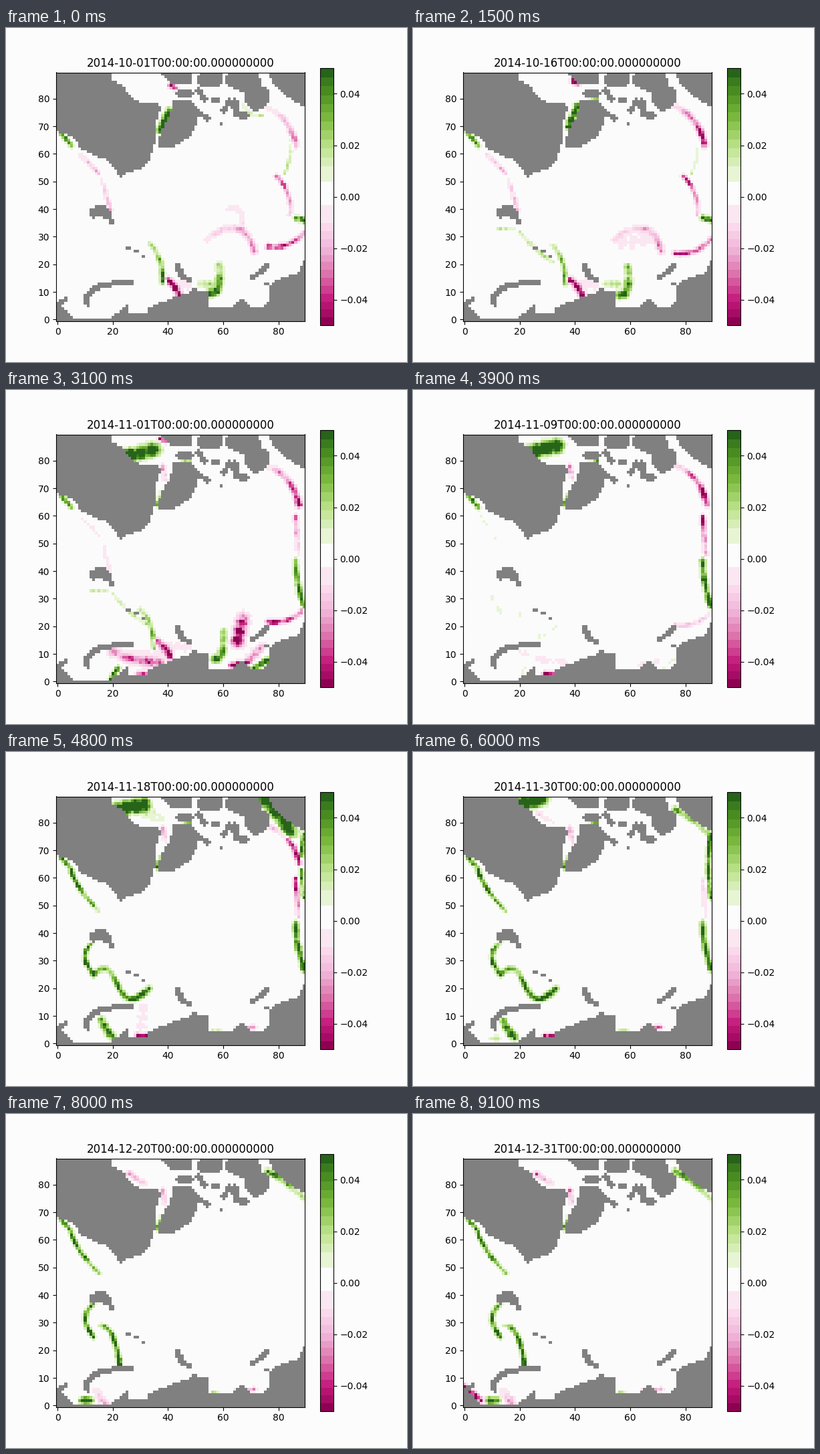
A matplotlib script for the animation above (9.2 s loop, 600 px wide and 500 px high).

```python
import numpy as np
import matplotlib.pyplot as plt
from matplotlib.animation import FuncAnimation
from matplotlib.colors import ListedColormap
from matplotlib.path import Path

SIZE, DAYS, SAMPLES, FADE = 90, 92, 48, 8
plt.rcParams["text.kerning_factor"] = 6

rows, cols = np.mgrid[:SIZE, :SIZE]
is_land = np.zeros((SIZE, SIZE), bool)
fronts = []


def curve(points):
    """Evenly sampled Bezier curve through the first and last control points."""
    t = np.linspace(0, 1, SAMPLES)[:, None, None]
    p = np.array(points, float)[None]
    while p.shape[1] > 1:
        p = p[:, :-1] * (1 - t[:, 0:1]) + p[:, 1:] * t[:, 0:1]
    return p[:, 0]


def nearest(x, y, line):
    """Index of and squared distance to the closest sample of a line."""
    dist = (x[:, None] - line[:, 0]) ** 2 + (y[:, None] - line[:, 1]) ** 2
    return dist.argmin(axis=1), dist.min(axis=1)


# ---- land ----
def land(*corners):
    centres = np.column_stack([cols.ravel() + .5, rows.ravel() + .5])
    is_land[Path(corners).contains_points(centres).reshape(SIZE, SIZE)] = True


def ridge(radius, *points):
    _, dist = nearest(cols.ravel(), rows.ravel(), curve(points))
    is_land[(dist < radius ** 2).reshape(SIZE, SIZE)] = True


land((0, 91), (20, 91), (20, 87.5), (24, 85.5), (28, 80), (30, 79.4), (37, 79),
     (38, 77), (36, 71), (36, 65), (33, 57), (30, 55), (26, 54), (23.5, 52),
     (19, 58), (14, 60), (8, 63), (7, 66), (0, 69))
land((39, 62.6), (37.4, 63.5), (37, 65.5), (39.5, 72.5), (41, 73), (42, 80),
     (49, 80), (51, 77), (51, 72), (49, 67.5), (44, 64), (42.5, 62.6))
land((38.4, 91), (38.4, 89.4), (41, 87), (41, 86), (49.4, 86), (49.4, 91))
land((52, 91), (51, 87), (53, 85), (57, 84.6), (59.6, 86), (59.6, 91))
land((62, 91), (61, 86), (67.5, 83), (68, 79), (72, 75.6), (77, 79), (77, 84),
     (74, 85), (73, 91))
land((76.6, 91), (78, 86), (84.6, 80.6), (91, 76.8), (91, 91))
land((0, -1), (0, 7), (6.6, 1), (19.5, 1), (25.5, 6), (26.5, 3), (33, 3),
     (33.5, 5), (37.5, 6.6), (48, 10.6), (49, 12), (55, 10.6), (55.2, 5), (63, 5),
     (67, 8), (71, 5), (75, 5.5), (77, 8), (77.4, 13), (79, 15), (87, 17.2),
     (89, 21.5), (91, 21.5), (91, -1))

# Islands
ridge(1.1, (44, 82), (48, 82))
ridge(1.1, (51, 83), (53, 80))
ridge(1.1, (51, 75), (54, 73))
ridge(.9, (56, 80), (58, 79))
ridge(1.1, (60, 76), (62, 79))
ridge(1.3, (64, 79), (64, 73), (68, 74))
ridge(.6, (59, 71))
ridge(1.8, (13, 38.5), (16, 41), (18, 38))
ridge(.8, (19, 36), (20, 35))
ridge(.8, (25.5, 26))
ridge(.8, (28.5, 25))
ridge(.6, (31, 23))
ridge(1, (11, 5.5), (9, 13), (19, 13), (27, 13.5))
ridge(.8, (1.5, 6.5), (3, 7.5))
ridge(1, (44, 20), (43, 17), (48, 14))
ridge(.9, (70, 15), (73, 17), (76, 20))
ridge(.6, (75, 13), (76, 13))


# ---- moving fronts ----
def front(days, width, strength, *points, drift=(0, 0)):
    """A line of change: strength runs from end to end, in thousandths."""
    level = np.linspace(*strength, SAMPLES)
    fronts.append((days, width, level, curve(points), np.array(drift)))


AUTUMN, FREEZE, WINTER = (-9, 38), (22, 40), (38, 100)

# Western shore and its island
front((-9, 100), .8, (50, 35), (1, 68), (5, 63))
front((-9, 34), .75, (-9, -20), (8, 60), (15, 53))
front((-9, 34), .75, (-6, -24), (16, 51), (19, 40))
front(WINTER, .8, (60, 25), (5, 62), (8, 55), (15, 48))
front((6, 38), .8, (16, 10), (12, 33), (18, 33))
front(WINTER, .8, (35, 60), (13, 37), (7, 32), (13, 25))

# Main ice edge, drifting west
front(AUTUMN, .9, (15, 45), (34, 28), (39, 24), (39, 14), drift=(-5, -2))
front((6, 38), .8, (14, 18), (20, 32), (24, 26), (32, 21))
front((38, 68), 1, (25, 60), (14, 26), (23, 33), (20, 7), (33, 20))
front((60, 100), .9, (25, 65), (17, 29), (22, 29), (24, 15), drift=(-3, 0))

# Southern seas
front(AUTUMN, 1.1, (-40, -60), (40, 15), (43, 13), (45, 9), drift=(-5, 0))
front(AUTUMN, 2, (-6, -7), (41, 13), (47, 13))
front(FREEZE, 1.6, (-24, -35), (20, 11), (28, 7), (37, 7))
front(FREEZE, 2.4, (-6, -7), (29, 9), (38, 11))
front((26, 74), .8, (-50, -45), (29, 3), (32, 3))
front((42, 56), 2, (-6, -8), (31, 13), (30, 5))
front((40, 68), 1.3, (40, 60), (17, 9), (18, 6), (21, 3), drift=(-4, -1))
for days in (FREEZE, (62, 80)):
    front(days, .9, (40, 55), (19, 1), (22, 5))
front((58, 100), 1.1, (55, 60), (9, 2), (12, 2))
front((60, 100), 1.5, (-9, -22), (14, 5), (17, 1))
front((80, 100), .9, (-60, -55), (0, 7), (6, 2))

# Delta and the open arc
front(AUTUMN, 1.4, (65, 25), (55, 10), (59, 10), (58, 20), drift=(2, -2))
front((-9, 25), 1.5, (10, 20), (50, 13), (55, 13))
front((-9, 22), 1.1, (-9, -30), (54, 29), (62, 36), (69, 34), (71, 25))
front((-9, 12), 1, (-9, -8), (62, 40), (67, 42), (67, 34))
front((8, 24), 3, (-6, -6), (57, 28), (67, 29))
front((20, 38), 2.1, (-45, -60), (67, 23), (65, 15))
front((-9, 42), .9, (-50, -25), (76, 28), (84, 27), (89, 33), drift=(0, -8))
front(FREEZE, 1, (-60, -50), (63, 6), (69, 7))
front(FREEZE, 1.1, (40, 60), (71, 5), (76, 8))
front(FREEZE, 1.5, (-24, -20), (70, 9), (74, 13))
front((42, 100), .8, (18, -28), (56, 5), (71, 6))

# Eastern shore
front((-4, 58), 1, (-12, -60), (75, 77), (84, 73), (86, 63), drift=(2, 2))
front((-9, 20), .8, (8, 20), (84, 65), (85, 60), (82, 53))
front((-9, 24), .8, (-45, -12), (79, 52), (85, 46), (84, 38))
front((26, 62), .8, (-45, -15), (86, 60), (87, 46))
front((-9, 24), 1, (40, 60), (86, 37), (89, 36))
front((24, 68), 1, (40, 60), (86, 44), (86, 36), (89, 27))
front((40, 58), 2.4, (90, 60), (75, 89), (79, 86), (84, 77))
front((54, 100), 1.1, (50, 18), (76, 85), (82, 82), (89, 75))
front((42, 72), .9, (40, 65), (89, 53), (87, 64), (89, 76))

# Northern bay, strait and channels
front((24, 80), 2.2, (90, 80), (28, 81), (37, 83), drift=(-14, 9))
front((40, 57), 2.6, (12, 8), (31, 84), (37, 82))
front((56, 100), 1, (-28, -7), (26, 84), (32, 80))
front((-9, 40), .8, (-60, -35), (42, 84), (44, 83), drift=(-6, 5))
front((-9, 24), 1.2, (70, 65), (37, 68), (40, 75), drift=(1, 3))
front((24, 100), .9, (40, 15), (36, 64), (38, 69))
front((24, 100), .9, (-10, -25), (39, 73), (38, 78))
front((6, 76), .7, (12, 30), (45, 80), (48, 80))
front((-9, 8), .9, (10, 14), (67, 78), (68, 74), (74, 74))

sea_y, sea_x = np.nonzero(~is_land)
wave = np.arange(SAMPLES)


def field(day):
    change = np.zeros((SIZE, SIZE))
    for order, ((first, last), width, level, line, drift) in enumerate(fronts):
        if not first < day < last:
            continue
        fade = min(1, (day - first) / FADE, (last - day) / FADE)
        patches = 1 + .25 * np.sin(wave / 3 + order + day / 2)
        line = line + drift * (day - first) / (last - first)
        reach = 2.5 * width
        low, high = line.min(axis=0) - reach, line.max(axis=0) + reach
        near = ((sea_x > low[0]) & (sea_x < high[0])
                & (sea_y > low[1]) & (sea_y < high[1]))
        x, y = sea_x[near], sea_y[near]
        closest, dist = nearest(x, y, line)
        change[y, x] += fade * (level * patches)[closest] * np.exp(-dist / width ** 2)
    grain = np.random.default_rng(day).uniform(.75, 1.25, change.shape)
    return np.ma.array(change * grain / 1000, mask=is_land)


def banded_map():
    """Pink to green in coarse steps with a wide, near-white middle."""
    edges = np.r_[np.linspace(-.05, -.0103, 14), -.003, .0059,
                  np.linspace(.0118, .05, 12)]
    centres = (edges[1:] + edges[:-1]) / 2
    colours = plt.get_cmap("PiYG")(centres * 10 + .5)
    colours[14] = (.988, .988, .988, 1)
    colours[0], colours[-1] = plt.get_cmap("PiYG")([0., 1.])
    shades = (np.arange(256) + .5) / 2560 - .05
    cmap = ListedColormap(colours[np.digitize(shades, edges) - 1])
    cmap.set_bad("gray")
    return cmap


fig, ax = plt.subplots(figsize=(6, 5), dpi=100, facecolor="#fcfcfc")
ax.set_facecolor("#fcfcfc")
image = ax.imshow(field(0), origin="lower", cmap=banded_map(), vmin=-.05, vmax=.05,
                  interpolation="nearest")
fig.colorbar(image)
title = ax.set_title("")


def update(day):
    image.set_data(field(day))
    date = np.datetime64("2014-10-01") + day
    title.set_text(f"{date}T00:00:00.000000000")
    return image, title


anim = FuncAnimation(fig, update, frames=DAYS, interval=100, repeat=True, repeat_delay=0)
plt.show()
```
